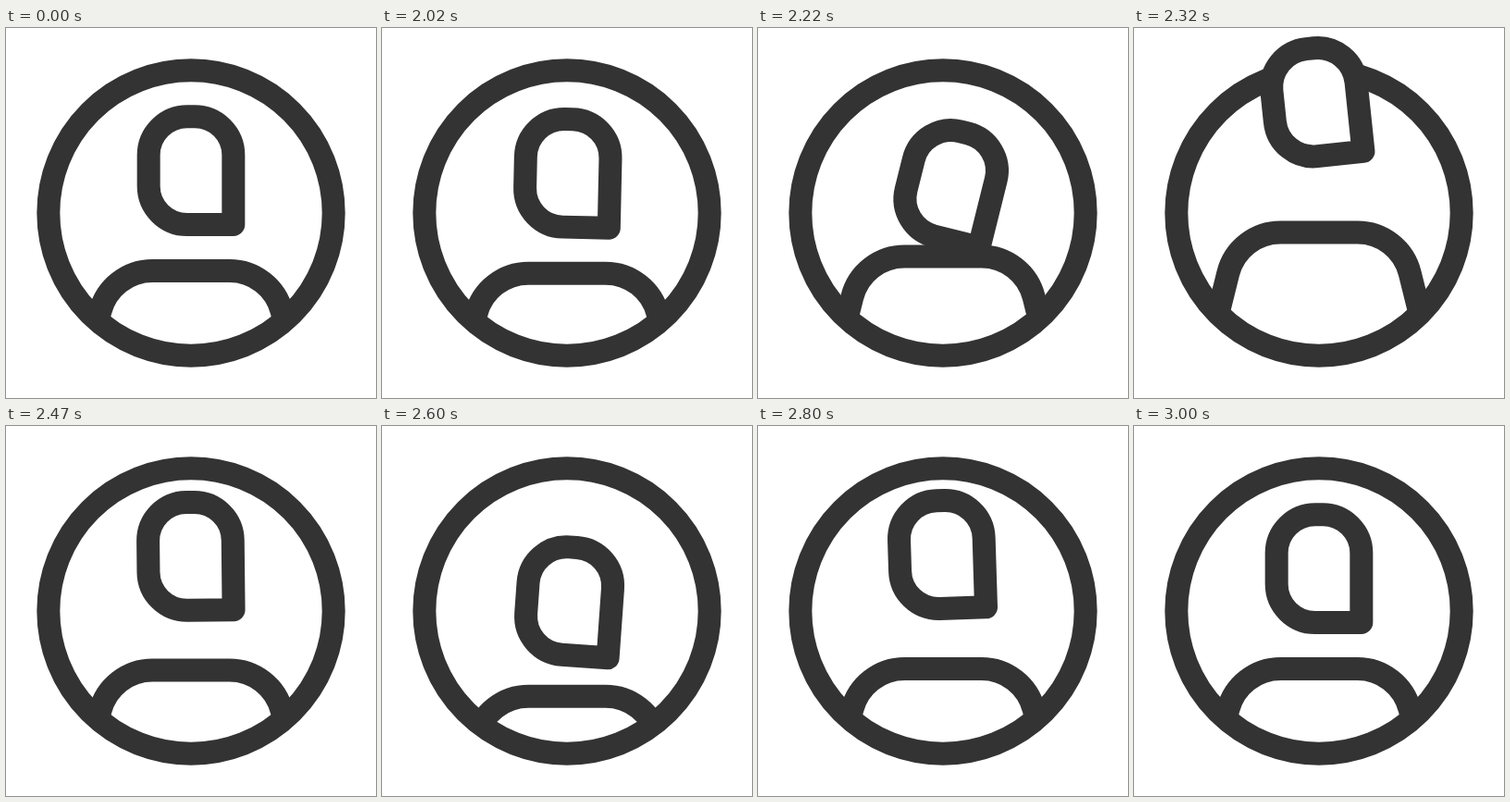
An HTML page with a canvas that plays this animation: 400x400 px, repeating every 3.02 s.

```html
<!DOCTYPE html>
<html lang="en">
<head>
<meta charset="utf-8">
<title>Jumping profile icon</title>
<style>
  html, body { margin: 0; width: 100%; height: 100%; overflow: hidden; background: #fff; }
  canvas { display: block; width: 400px; height: 400px; }
</style>
</head>
<body>
<canvas id="stage" width="400" height="400"></canvas>
<script>
const ctx = document.getElementById('stage').getContext('2d');
const LOOP = 3020, REST = 2000, STEP = 25;
const INK = '#333', PAPER = '#fff';

// Keys are [ms after the rest, value], eased in and out between neighbours.
const headY   = [[0, 0], [167, 45], [345, -78.5], [583, 36], [800, -15.2], [1000, 0]];
const headRot = [[0, 0], [167, 21], [345, -7], [583, 4.2], [800, -1.8], [1000, 0]];
const bodyY   = [[0, 0], [100, 17], [333, -41.7], [583, 30.3], [800, 0]];

function valueAt(keys, t) {
  for (let i = 1; i < keys.length; i++) {
    const [t0, a] = keys[i - 1], [t1, b] = keys[i];
    if (t < t1) {
      const u = Math.max(0, (t - t0) / (t1 - t0));
      return a + (b - a) * u * u * (3 - 2 * u);
    }
  }
  return keys[keys.length - 1][1];
}

function ringPath(r) {
  ctx.beginPath();
  ctx.arc(200, 200, r, 0, Math.PI * 2);
}

function drawBody(dy) {
  const r = 58.33, tilt = 14 * Math.PI / 180;
  const cy = 320.83 + dy;
  const legX = 70 * Math.sin(tilt), legY = 70 * Math.cos(tilt);
  const endX = r * Math.cos(tilt), endY = cy - r * Math.sin(tilt);
  ctx.save();
  ringPath(160);
  ctx.clip();
  ctx.beginPath();
  ctx.moveTo(158.33 - endX - legX, endY + legY);
  ctx.arc(158.33, cy, r, Math.PI + tilt, Math.PI * 1.5);
  ctx.arc(241.67, cy, r, -Math.PI / 2, -tilt);
  ctx.lineTo(241.67 + endX + legX, endY + legY);
  ctx.stroke();
  ctx.restore();
}

function drawHead(dy, deg) {
  const left = 154.17, right = 245.83, top = 95.83, bottom = 212.5, r = 41.67;
  ctx.save();
  ctx.translate(200, 190 + dy);
  ctx.rotate(deg * Math.PI / 180);
  ctx.translate(-200, -190);
  ctx.beginPath();
  ctx.moveTo(right, bottom);
  ctx.arcTo(left, bottom, left, top, r);
  ctx.arcTo(left, top, right, top, r);
  ctx.arcTo(right, top, right, bottom, r);
  ctx.closePath();
  ctx.fill();
  ctx.stroke();
  ctx.restore();
}

function draw(now) {
  // The motion advances in 25 ms steps, with starts rounded down to 10 ms.
  const t = Math.floor((now % LOOP - REST + 5) / STEP) * STEP;
  const pose = Math.min(1000, Math.max(0, t));

  ctx.fillStyle = PAPER;
  ctx.fillRect(0, 0, 400, 400);
  ctx.strokeStyle = INK;
  ctx.lineWidth = 25;
  ctx.lineJoin = 'round';

  drawBody(valueAt(bodyY, pose));
  ringPath(154.17);
  ctx.stroke();
  drawHead(valueAt(headY, pose), valueAt(headRot, pose));
}

const start = performance.now();
function tick() {
  draw(performance.now() - start);
  requestAnimationFrame(tick);
}
tick();
</script>
</body>
</html>
```
